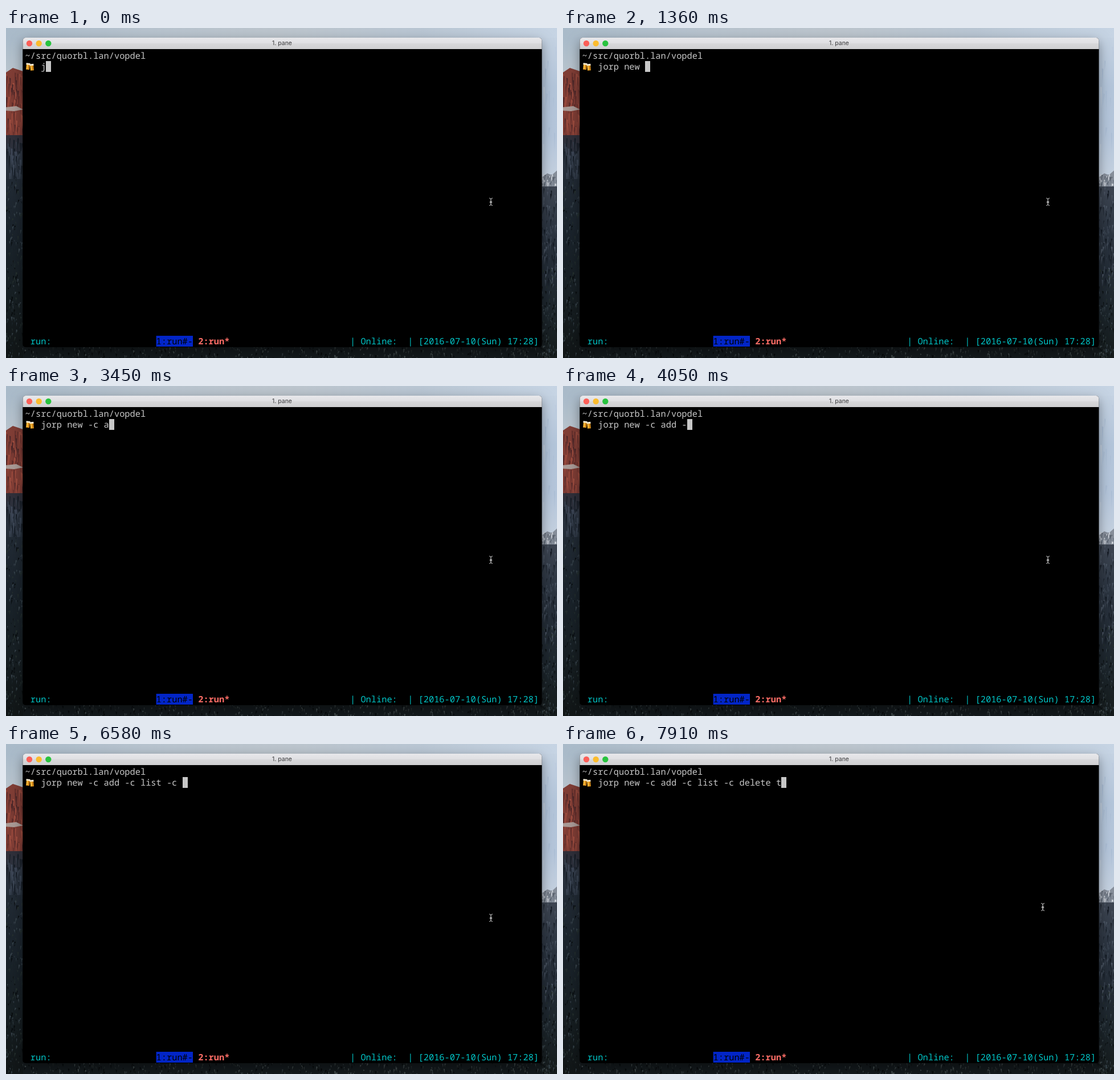
An HTML page with a canvas that plays this animation: 967 px wide and 579 px high, repeating every 8 s.

```html
<!DOCTYPE html>
<html lang="en">
<head>
<meta charset="utf-8">
<title>Terminal</title>
<style>
html, body { margin: 0; width: 100%; height: 100%; overflow: hidden; background: #000; }
#stage { position: relative; width: 967px; height: 579px; overflow: hidden; }
#stage > * { position: absolute; }
.row {
  font: 15.3333px/19px "Noto Sans Mono", "DejaVu Sans Mono", monospace;
  white-space: pre; color: #c7c7c7;
  text-rendering: geometricPrecision; font-variant-ligatures: none;
}
.cyan { color: #00c5c7; }
.tab { color: #000; }
.active { color: #ff6e67; font-weight: 700; }
#title {
  left: 30px; width: 909px; top: 20px; text-align: center;
  font: 10.5px/14px Inter, "Open Sans", sans-serif; color: #3c3c3e;
}
#caret { top: 58px; width: 9px; height: 19px; background: #c7c7c7; }
#mouse { left: 0; top: 0; }
</style>
</head>
<body>
<div id="stage">
  <canvas id="back" width="967" height="579"></canvas>
  <div id="title">1. pane</div>
  <div id="caret"></div>
  <svg id="mouse" width="8" height="16" fill="none">
    <path d="M1 1.5Q4 1.5 4 4V12Q4 14.5 1 14.5M7 1.5Q4 1.5 4 4M4 12Q4 14.5 7 14.5" stroke="#c4c4c4"/>
    <path d="M4 5.5L6.5 8.5L4 11.5L1.5 8.5Z" fill="#a8a8a8"/>
  </svg>
</div>
<script>
const stage = document.getElementById('stage');
const caret = document.getElementById('caret');
const mouse = document.getElementById('mouse');
const g = document.getElementById('back').getContext('2d');

const LOOP = 8000, LEFT = 33.6, CELL = 9.2;
const COMMAND = 'jorp new -c add -c list -c delete t';
const colX = col => LEFT + col * CELL;

// Typing bursts: start, interval, characters added at each step
const BURSTS = [
  [290, 180, [2, 2]],
  [920, 146, [1, 1, 1, 1]],
  [2110, 150, [1, 1, 1]],
  [3310, 145, [1, 1, 1]],
  [3900, 150, [1, 1, 1, 1]],
  [4940, 146, [1, 1, 2, 1]],
  [5680, 300, [1, 1]],
  [6580, 300, [1]],
  [6880, 147, [1, 1, 1, 1, 1, 1, 1, 1]]
];

let seed = 11;
function rnd() {
  seed = (seed * 16807) % 2147483647;
  return seed / 2147483647;
}

function rect(x, y, w, h, fill) {
  g.fillStyle = fill;
  g.fillRect(x, y, w, h);
}

function shape(points, fill) {
  g.fillStyle = fill;
  g.beginPath();
  points.forEach(([x, y]) => g.lineTo(x, y));
  g.fill();
}

function disc(x, y, r, fill) {
  g.fillStyle = fill;
  g.beginPath();
  g.arc(x, y, r, 0, 7);
  g.fill();
}

function gradient(x, y, w, h, dx, dy, stops) {
  const f = g.createLinearGradient(x, y, x + dx, y + dy);
  stops.forEach((c, i) => f.addColorStop(i / (stops.length - 1), c));
  rect(x, y, w, h, f);
}
const fade = (x, y, w, h, ...stops) => gradient(x, y, w, h, 0, h, stops);
const sweep = (x, y, w, h, ...stops) => gradient(x, y, w, h, w, 0, stops);

// Small slanted flecks that roughen rock and forest
function flecks(n, x, y, w, h, tall, colors) {
  for (let i = 0; i < n; i++) {
    const px = x + rnd() * w, py = y + rnd() * h, len = tall * (0.4 + rnd());
    shape([[px, py], [px + 1 + rnd() * 2, py + 1], [px + rnd() * 3 - 1, py + len]],
      colors[Math.floor(rnd() * colors.length)]);
  }
}

function wallpaper() {
  rect(0, 0, 967, 579, '#13191c');
  sweep(0, 0, 967, 30, '#a9bac9', '#b7c3ce', '#bcc5cd', '#b9c6d3', '#c6d4e4');
  fade(0, 17, 30, 65, '#a9bac9', '#b9c4cd');
  fade(940, 17, 27, 260, '#c4d2e2', '#b2c4d9', '#b4c5da', '#c8d3e0');

  shape([[0, 78], [12, 70], [30, 76], [30, 205], [0, 195]], '#803d35');
  flecks(80, 0, 78, 30, 112, 22, ['#a85343', '#612e2b', '#4b2729', '#97483c']);
  shape([[0, 139], [18, 137], [30, 143], [14, 146], [0, 145]], '#a99a96');
  fade(0, 188, 30, 90, '#302f39', '#29323e', '#202933');
  flecks(60, 0, 188, 30, 80, 24, ['#3e4858', '#171e27', '#343e4b']);
  fade(0, 265, 30, 314, '#212a34', '#19222a', '#161e22', '#101516');
  flecks(190, 0, 265, 30, 310, 7, ['#36424a', '#080c0e', '#26312f', '#1a2429']);

  flecks(14, 940, 30, 27, 220, 30, ['#bccbde', '#aabdd4', '#c6d2e0']);
  shape([[940, 262], [950, 255], [958, 258], [967, 250], [967, 290], [940, 290]], '#868e9a');
  flecks(40, 940, 256, 26, 18, 9, ['#d0d5dc', '#4a525e', '#747d8a']);
  fade(940, 278, 27, 301, '#3d4552', '#2b3440', '#222b35', '#1b242a', '#141a1b');
  flecks(110, 940, 275, 27, 170, 12, ['#4b5563', '#151c25', '#38424f']);
  flecks(110, 940, 415, 27, 160, 7, ['#36424a', '#0b1012', '#26312f']);

  flecks(420, 20, 556, 930, 23, 6, ['#333b3e', '#070a0b', '#262d2c', '#424b4c']);
}

function mug(x, y, tilt) {
  g.save();
  g.translate(x, y);
  g.rotate(tilt);
  rect(-3, -4, 6, 10, '#e69a1d');
  rect(-2, -2, 1.5, 7, '#f7c64a');
  rect(1, -2, 1, 7, '#b96a12');
  rect(-3.5, -5.5, 7, 3, '#f4ead2');
  g.restore();
}

function framePath() {
  g.beginPath();
  g.roundRect(29.5, 17, 910.8, 543, 5);
}

function windowFrame() {
  g.save();
  g.shadowColor = 'rgba(0,0,0,.4)';
  g.shadowBlur = 20;
  g.shadowOffsetY = 7;
  g.fillStyle = '#000';
  framePath();
  g.fill();
  g.restore();

  g.save();
  framePath();
  g.clip();
  fade(29, 17, 912, 10, '#e8e8eb', '#dfdfe2');
  fade(29, 27, 912, 10, '#d8d8da', '#cfcfd1');
  rect(29, 37, 912, 523, '#000');
  g.restore();

  disc(41, 27, 5.2, '#fb5f58');
  disc(57.7, 27, 5.2, '#fbbc2e');
  disc(74.3, 27, 5.2, '#29c33f');
  mug(38.6, 67, 0.1);
  mug(45.4, 68.5, -0.1);
  rect(263.6, 540, 64.4, 19, '#0225c7');
}

function label(col, top, text, kind = '') {
  const el = document.createElement('div');
  el.className = 'row ' + kind;
  el.style.left = colX(col) + 'px';
  el.style.top = top + 'px';
  el.textContent = text;
  stage.insertBefore(el, mouse);
  return el;
}

function typedAt(t) {
  let n = 1;
  for (const [start, gap, counts] of BURSTS)
    counts.forEach((c, i) => { if (t >= start + i * gap) n += c; });
  return n;
}

wallpaper();
windowFrame();
label(0, 40, '~/src/quorbl.lan/vopdel');
label(1, 541, 'run:', 'cyan');
label(25, 541, '1:run#-', 'tab');
label(33, 541, '2:run*', 'active');
label(62, 541, '| Online:  | [2016-07-10(Sun) 17:28]', 'cyan');
const prompt = label(3, 59, '');

function draw(now) {
  const t = now % LOOP;
  const n = typedAt(t);
  prompt.textContent = COMMAND.slice(0, n);
  caret.style.left = Math.round(colX(3 + n)) + 'px';
  const moved = t >= 7909 ? 1 : t >= 7762 ? 0.5 : 0;
  mouse.style.transform =
    `translate(${Math.round(847 - 9 * moved)}px, ${Math.round(297 - 19 * moved)}px)`;
}

const begin = performance.now();
function tick() {
  draw(performance.now() - begin);
  requestAnimationFrame(tick);
}
tick();
</script>
</body>
</html>
```
